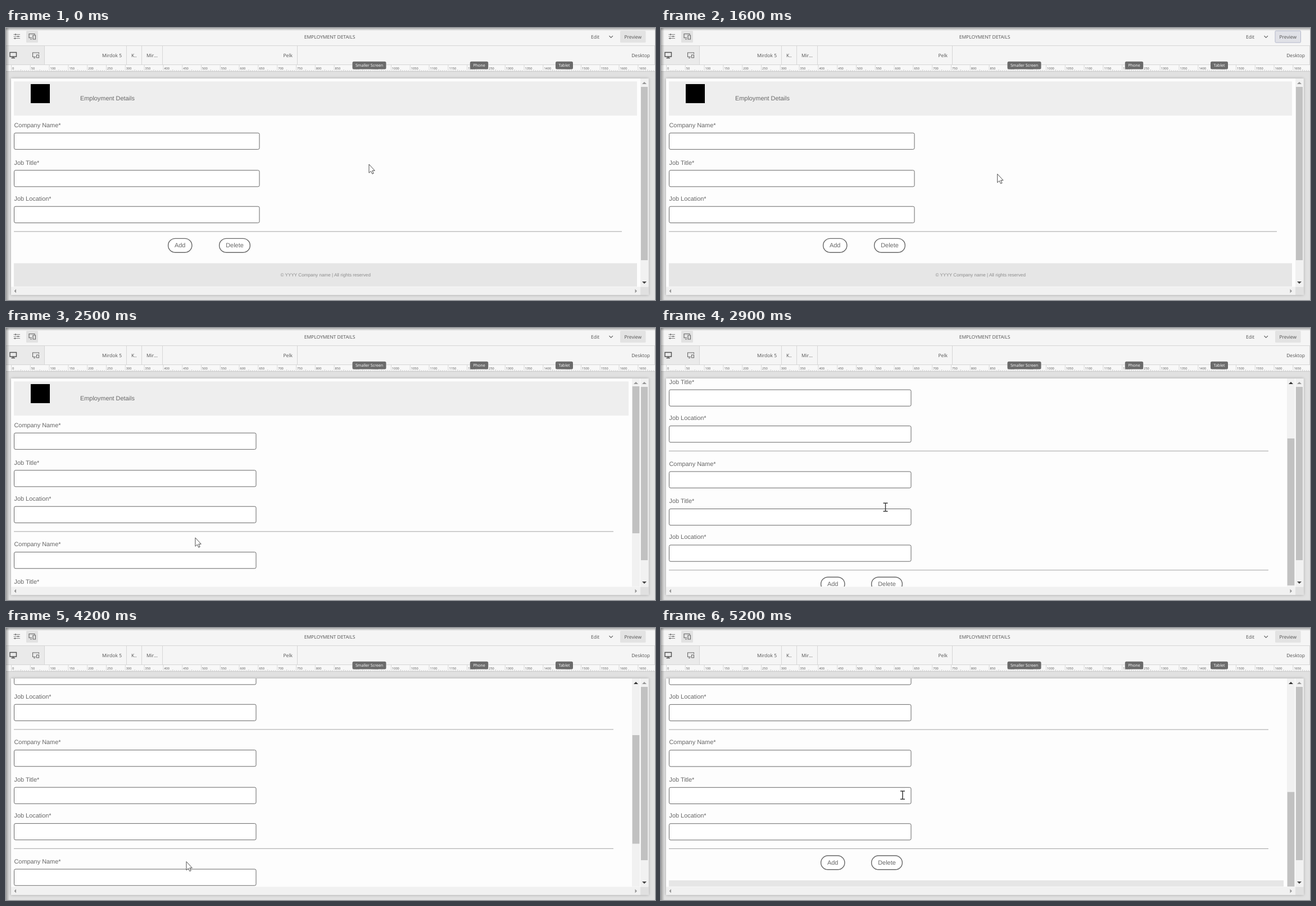
An HTML page for the animation above (6 s loop, 1155 by 485 pixels).

```html
<!DOCTYPE html>
<html lang="en">
<head>
<meta charset="utf-8">
<title>Employment Details</title>
<style>
html, body { margin: 0; width: 100%; height: 100%; overflow: hidden; background: #e1e1e1; }
svg { display: block; }
text { font-family: "Open Sans", sans-serif; font-size: 8.5px; fill: #505050; text-rendering: geometricPrecision; }
.form text { font-family: "Liberation Sans", Arial, sans-serif; font-size: 10.9px; fill: #666; }
.form .small { font-size: 8.15px; fill: #8c8c8c; }
.form .on { fill: #fff; }
.num { font-size: 5.6px; fill: #555; }
.tip { font-size: 7.1px; fill: #fff; }
.icon { fill: none; stroke: #666; stroke-width: 1.1; }
</style>
</head>
<body>
<svg id="stage" width="1155" height="485" viewBox="0 0 1155 485">
  <defs>
    <clipPath id="view"><rect x="9" y="90" width="1119" height="371"/></clipPath>
    <linearGradient id="down" x2="0" y2="1"><stop stop-color="#000" stop-opacity=".3"/><stop offset="1" stop-color="#000" stop-opacity="0"/></linearGradient>
    <linearGradient id="side"><stop stop-color="#000" stop-opacity=".3"/><stop offset="1" stop-color="#000" stop-opacity="0"/></linearGradient>
  </defs>
  <g id="chrome"></g>
  <g id="preview"></g>
  <g id="form" class="form" clip-path="url(#view)"></g>
  <g id="bars"></g>
  <rect width="1155" height="5" fill="url(#down)"/>
  <rect width="6" height="485" fill="url(#side)"/>
  <path id="cursor" stroke-linejoin="round"/>
</svg>
<script>
const $ = id => document.getElementById(id);
const rect = (x, y, w, h, fill, more = '') =>
  `<rect x="${x}" y="${y}" width="${w}" height="${h}" fill="${fill}" ${more}/>`;
const text = (x, y, s, cls = '', anchor = 'start') =>
  `<text x="${x}" y="${y}" class="${cls}" text-anchor="${anchor}">${s}</text>`;
const path = (d, more = 'class="icon"') => `<path d="${d}" ${more}/>`;
const box = (x, y, w, h, r, width, fill = '#fff') =>
  rect(x, y, w, h, fill, `rx="${r}" stroke="#666" stroke-width="${width}"`);

// Toolbar, device bar, ruler and window frame
function chrome() {
  let s = rect(0, 0, 1155, 65, '#f5f5f5') + rect(0, 32, 68, 33, '#eaeaea') + rect(0, 65, 1155, 12, '#f8f8f8');
  s += path('M0 31.5H1155M0 65.5H1155M68.5 32V65M214.5 32V65M241.5 32V65M278.5 32V65M518.5 32V65M1154.5 32V65',
    'stroke="#d6d6d6"');
  s += path('M0 77.5H1155', 'stroke="#cacaca"');

  let minor = '', major = '';
  for (let i = 0; i < 34; i++) {
    const x = 9.5 + 33.8 * i;
    major += `M${x} 66V77`;
    for (let j = 1; j < 10; j++) minor += `M${x + 3.38 * j} ${j == 5 ? 74 : 75}V77`;
    s += text(x + 1.5, 73.5, i * 50, 'num');
  }
  s += path(minor, 'stroke="#b4b4b4" stroke-width=".7"') + path(major, 'stroke="#cfcfcf" stroke-width=".8"');

  for (const [x, w, name] of [[616.5, 60, 'Smaller Screen'], [825.8, 32.4, 'Phone'], [978, 31, 'Tablet']])
    s += rect(x, 59.8, w, 13.8, '#6b6b6b', 'rx="2.5"') + text(x + w / 2, 69.3, name, 'tip', 'middle');

  s += text(576, 18.5, 'EMPLOYMENT DETAILS', '', 'middle') + text(1041, 18.5, 'Edit')
    + text(206, 52, 'Mirdok 5', '', 'end') + text(223, 52, 'K..') + text(250, 52, 'Mir...')
    + text(510, 52, 'Pelk', '', 'end') + text(1146, 52, 'Desktop', '', 'end');

  s += rect(36, 5, 21, 21, '#e2e2e2', 'rx="1.5"');
  s += path('M13.5 11.5H25M13.5 15H25M13.5 18.5H25', 'class="icon" style="stroke-width:.8"')
    + path('M17 10.2V12.8M21.5 13.7V16.3M16 17.2V19.8', 'class="icon" style="stroke-width:1.6"');
  s += path('M46 17.5H41V10.5H51V12M43 20H46M48 13H52.5V20H48Z');
  s += path('M7 43.5H18.5V51H7ZM12.7 51V53.5M9.5 53.5H16', 'class="icon" style="stroke:#505050;stroke-width:1.4"');
  s += path('M53 51.5H47.5V44H58.5V46M49 53.5H52M54.5 48H58.5V53H54.5Z');
  s += path('M1073.5 14L1076.7 17.2 1080 14');

  return s + rect(9, 90, 1134.5, 386, '#fdfdfd', 'style="filter:drop-shadow(0 0 2.5px #0004)"');
}

function frameBars() {
  return rect(1129, 90, 14.5, 371, '#f1f1f1') + rect(1130, 105, 12, 309, '#c1c1c1')
    + rect(9, 461.5, 1120, 14.5, '#f1f1f1') + rect(1129, 461.5, 14.5, 14.5, '#e0e0e0')
    + path('M1132 100L1136 96 1140 100ZM18 465.5L14.5 469 18 472.5ZM1119.5 465.5L1123 469 1119.5 472.5Z', 'fill="#979797"')
    + path('M1132 452L1136 456 1140 452Z', 'fill="#444"');
}

function previewButton(t) {
  const pressed = t >= 900 && t < 1200, focus = t >= 1200 && t < 2300;
  const edge = pressed ? 'stroke="#4f86c6" stroke-width="1.6"' : focus ? 'stroke="#b3b8cb"' : '';
  return rect(1093, 5, 45.5, 21, focus ? '#e0e1e7' : '#e3e3e3', `rx="1.5" ${edge}`)
    + text(1115.7, 18.5, 'Preview', '', 'middle').replace('<text', pressed ? '<text style="fill:#45699c"' : '<text');
}

const PITCH = 212.4;
const FIELDS = [['Company Name*', 176.7, 187.2], ['Job Title*', 243.5, 253.7], ['Job Location*', 307.6, 318.2]];

function form(count, scroll, hover) {
  const fit = count > 1 ? 1094 / 1109 : 1;
  const px = v => Math.round(14 + v * fit);
  const at = (y, i = 0) => y + i * PITCH - scroll;
  const last = count - 1;

  let s = rect(14, at(95.3), 1109 * fit, 61, '#eee')
    + rect(44, at(100), 34, 34, '#000') + text(132, at(129), 'Employment Details');
  for (let i = 0; i < count; i++) {
    for (const [label, ly, by] of FIELDS)
      s += text(14.5, at(ly, i), label) + box(14.5, at(by, i), px(437) - 14.5, 29.2, 2.5, 1);
    s += rect(14, at(362.4, i), px(1082) - 14, 1, '#a2a2a2');
  }
  for (const [x, w, label] of [[274, 43.5, 'Add'], [365, 56, 'Delete']]) {
    const on = hover && label == 'Add';
    s += box(px(x) + .6, at(375.4, last), w - 1.2, 24.8, 12.4, 1.4, on ? '#666' : '#fff')
      + text(px(x) + w / 2, at(391, last), label, on ? 'on' : '', 'middle');
  }
  s += rect(14, at(419.4, last), 1109 * fit, 60, '#e6e6e6')
    + text(14 + 554.7 * fit, at(442.7, last), '© YYYY Company name | All rights reserved', 'small', 'middle');

  if (count > 1) {
    const k = count > 2 ? .478 : .647;
    s += rect(1114, 90, 14, 371, '#f1f1f1') + rect(1114.7, 104 + scroll * k, 12.6, 405 * k, '#c1c1c1')
      + path('M1117 100L1121 96 1125 100Z', `fill="${scroll ? '#333' : '#979797'}"`);
  }
  return s;
}

const SHAPES = {
  arrow: ['M0 0V15.3L3.5 12.2 5.9 17.2 8.2 16.2 5.9 11.3H10.3Z', '#fff', .9],
  hand: ['M-1.6 11V1.4Q-1.6 0 0 0T1.6 1.4V6L6 7Q8 7.6 7.7 10L6.3 17.5H-.8L-6 11Q-5.6 8.6 -3.6 9.4Z', '#fff', 1.1],
  beam: ['M-4 -7.3H4M0 -7.3V7.3M-4 7.3H4', 'none', 1.5]
};
// Each shape holds from its time until the next entry
const LOOKS = [[0, 'arrow'], [700, 'hand'], [1100, 'arrow'], [2000, 'hand'], [2300, 'arrow'], [2700, 'beam'],
  [3600, 'arrow'], [3800, 'hand'], [4100, 'arrow'], [4500, 'beam'], [4700, 'arrow'], [5200, 'beam']];
const MOVES = [[0, 646, 243], [700, 1121, 16], [1000, 1121, 16], [2000, 315, 393], [2400, 315, 393],
  [2700, 399.5, 319.5], [3200, 399.5, 319.5], [3700, 331, 412.5], [3900, 321, 416.5], [4300, 321, 416.5],
  [4500, 428, 295], [4600, 428, 295], [4700, 430, 298], [6000, 430, 298]];
const SCROLLS = [[0, 0], [2600, 0], [2900, 143.6], [3000, 182], [4600, 182], [4900, 394.2], [6000, 394.2]];

const linear = u => u, smooth = u => u * u * (3 - 2 * u);
function follow(keys, t, ease) {
  const i = keys.findIndex(k => k[0] > t), a = keys[i - 1], b = keys[i];
  const u = ease((t - a[0]) / (b[0] - a[0]));
  return a.slice(1).map((v, j) => v + (b[j + 1] - v) * u);
}

function draw(t) {
  const count = t < 2300 ? 1 : t < 4100 ? 2 : 3;
  const look = LOOKS.findLast(k => k[0] <= t)[1];
  const [x, y] = follow(MOVES, t, smooth);
  const [d, fill, width] = SHAPES[look];
  $('preview').innerHTML = previewButton(t);
  $('form').innerHTML = form(count, follow(SCROLLS, t, linear)[0], look == 'hand' && t >= 2000);
  const attrs = { d, fill, stroke: '#3a3a3a', 'stroke-width': width, transform: `translate(${x} ${y})` };
  for (const name in attrs) $('cursor').setAttribute(name, attrs[name]);
}

$('chrome').innerHTML = chrome();
$('bars').innerHTML = frameBars();

const STEP = 100, LOOP = 6000;
let start, shown = -1;
function tick(now) {
  start ??= now;
  const t = Math.floor((now - start) % LOOP / STEP) * STEP;
  if (t != shown) draw(shown = t);
  requestAnimationFrame(tick);
}
draw(0);
requestAnimationFrame(tick);
</script>
</body>
</html>
```
